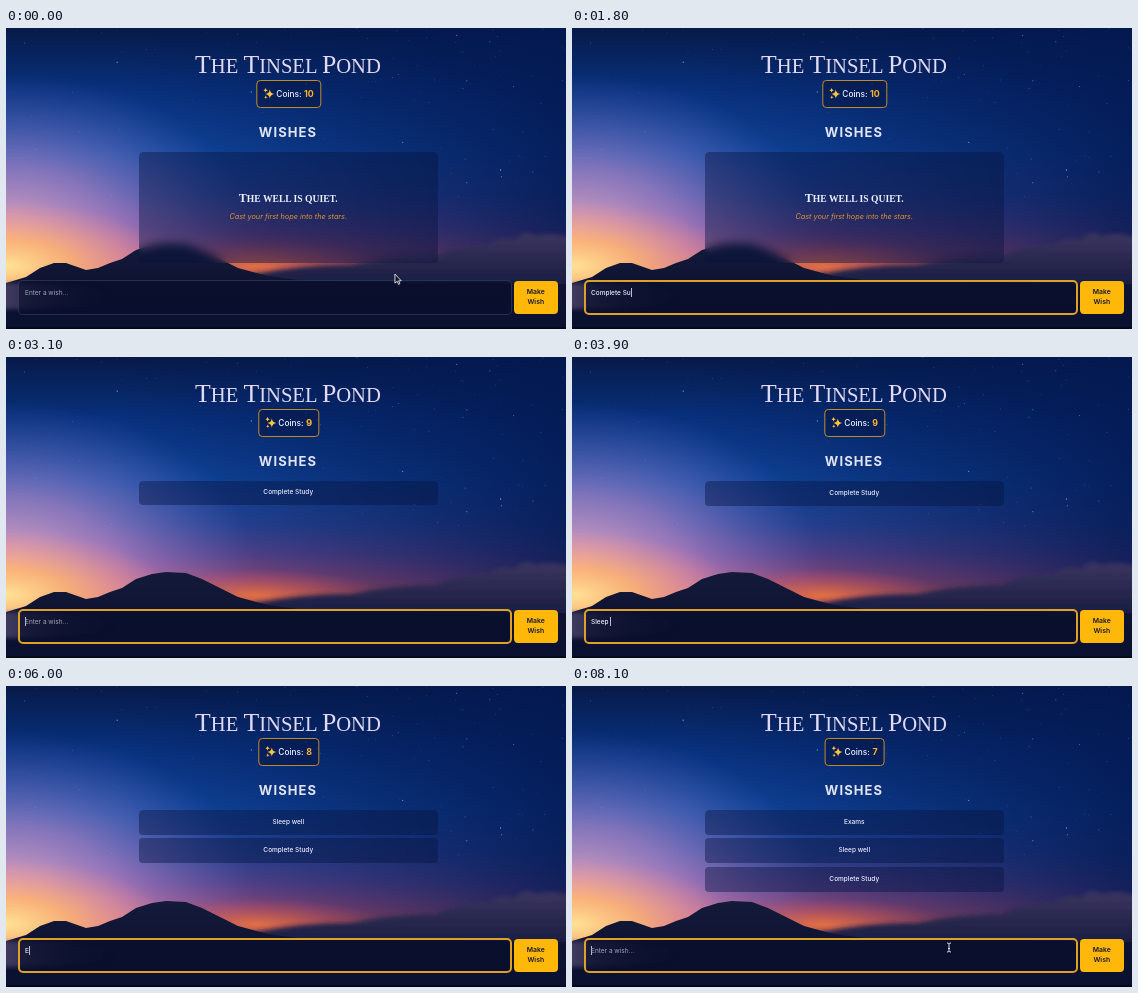
These frames come from a looping animation (560 by 301 pixels, 8.2 s). An HTML page:

```html
<!DOCTYPE html>
<html lang="en">
<head>
<meta charset="utf-8">
<title>Wishes</title>
<style>
  html, body { margin: 0; width: 100%; height: 100%; overflow: hidden; background: #050a20; }
  #stage { position: relative; width: 560px; height: 301px; overflow: hidden; font-family: Inter, sans-serif; color: #eef; }
  #stage > *, .panel { position: absolute; box-sizing: border-box; }
  .center { left: 0; width: 564px; text-align: center; white-space: nowrap; }
  .caps { font-family: "Liberation Serif", serif; text-transform: uppercase; }
  .caps b { font-size: 125%; font-weight: inherit; }
  #title { top: 22px; font-size: 20.6px; line-height: 30px; color: #e2daf2; }
  #coins { left: 282.5px; top: 51.5px; height: 28px; transform: translateX(-50%); display: flex; align-items: center;
    padding: 0 6.5px; border: 1px solid #c08a26; border-radius: 4px; background: rgba(5, 16, 55, .4);
    font-size: 8.3px; font-weight: 500; white-space: nowrap; }
  #coins svg { margin-right: 2px; }
  #count { display: inline-block; margin-left: 2.5px; font-size: 8.8px; font-weight: 700; color: #ffb52a; }
  #heading { top: 96px; font-size: 13px; line-height: 17px; font-weight: 700; letter-spacing: 1.1px; color: #e2e4f4; }
  .panel { left: 0; width: 299.5px; border-radius: 4px; background: rgba(9, 20, 62, .42); backdrop-filter: blur(5px); text-align: center; }
  #list { left: 132.5px; top: 123.5px; width: 299.5px; height: 120px; overflow: hidden; border-radius: 4px; }
  #empty { height: 111.5px; }
  #empty .caps { margin-top: 39px; font-size: 9.6px; line-height: 15px; font-weight: 700; }
  #empty i { display: block; margin-top: 4px; font-size: 7.3px; line-height: 13px; color: #d9942f; }
  .wish { height: 25px; font-size: 6.5px; font-weight: 500; line-height: 25px; }
  #field { left: 12px; top: 252px; width: 493.5px; height: 35px; border-radius: 5px; background: rgba(8, 14, 42, .6);
    border: 1px solid rgba(170, 170, 210, .2); }
  #field.focus { border: 2px solid #dfa02a; }
  #entry { left: 19px; top: 260px; font-size: 6.5px; font-weight: 500; line-height: 9px; white-space: pre; }
  #caret { display: inline-block; width: 1px; height: 8.5px; margin-right: -1px; vertical-align: -1.5px; background: #b9bccb; }
  #hint { font-weight: 400; color: #a4a5b8; }
  #button { left: 507.5px; top: 252.5px; width: 44.5px; height: 33px; border-radius: 4px; background: #ffb70a; color: #15182c;
    font-size: 6.8px; font-weight: 600; line-height: 10.5px; text-align: center; padding-top: 6px; }
</style>
</head>
<body>
<div id="stage">
  <svg width="560" height="301" viewBox="0 0 560 301">
    <defs>
      <linearGradient id="sky" x2="0" y2="1">
        <stop stop-color="#071a48"/>
        <stop offset=".2" stop-color="#08307c"/>
        <stop offset=".42" stop-color="#1149a2"/>
        <stop offset=".56" stop-color="#304ca0"/>
        <stop offset=".66" stop-color="#6b4d98"/>
        <stop offset=".74" stop-color="#b2557f"/>
        <stop offset=".8" stop-color="#e06052"/>
      </linearGradient>
      <linearGradient id="night">
        <stop offset=".2" stop-color="#031850" stop-opacity="0"/>
        <stop offset=".55" stop-color="#031850" stop-opacity=".4"/>
        <stop offset="1" stop-color="#031850" stop-opacity=".85"/>
      </linearGradient>
      <radialGradient id="dusk">
        <stop stop-color="#f0b4c0" stop-opacity=".95"/>
        <stop offset=".45" stop-color="#c490cc" stop-opacity=".6"/>
        <stop offset="1" stop-color="#6a70c8" stop-opacity="0"/>
      </radialGradient>
      <radialGradient id="glow">
        <stop stop-color="#ffe394"/>
        <stop offset=".4" stop-color="#ffb46a" stop-opacity=".8"/>
        <stop offset="1" stop-color="#f08a8a" stop-opacity="0"/>
      </radialGradient>
      <radialGradient id="ember">
        <stop stop-color="#f07840" stop-opacity=".8"/>
        <stop offset="1" stop-color="#c04a68" stop-opacity="0"/>
      </radialGradient>
      <linearGradient id="cloud" x2="0" y2="1">
        <stop stop-color="#3b3560"/>
        <stop offset=".4" stop-color="#1d2045"/>
        <stop offset="1" stop-color="#0a1030"/>
      </linearGradient>
      <linearGradient id="land" x2="0" y2="1">
        <stop stop-color="#141a3a"/>
        <stop offset=".5" stop-color="#0d1330"/>
        <stop offset="1" stop-color="#0a1030"/>
      </linearGradient>
      <linearGradient id="fog">
        <stop offset=".5" stop-color="#6a5c85"/>
        <stop offset="1" stop-color="#1b1c3b" stop-opacity="0"/>
      </linearGradient>
      <filter id="soft" x="-20%" y="-50%" width="140%" height="200%"><feGaussianBlur stdDeviation="2"/></filter>
    </defs>
    <rect width="560" height="301" fill="url(#sky)"/>
    <rect width="560" height="301" fill="url(#night)"/>
    <ellipse cx="0" cy="215" rx="250" ry="170" fill="url(#dusk)"/>
    <ellipse cx="0" cy="238" rx="165" ry="65" fill="url(#glow)"/>
    <ellipse cx="250" cy="238" rx="130" ry="26" fill="url(#ember)"/>
    <g id="stars" fill="#cfe0ff"></g>
    <path d="M225 251Q290 236 345 237Q385 228 430 228Q450 217 482 217Q495 207 508 212Q518 201 530 208Q546 203 565 210V320H225Z" fill="url(#cloud)" filter="url(#soft)"/>
    <path d="M-10 258L20 249 34 240 48 235 60 235 80 242 92 240 104 235 116 231 130 222 146 217 160 215 180 216 196 222 210 229 232 240 262 248 300 253 570 256V301H-10Z" fill="url(#land)"/>
    <ellipse cx="0" cy="268" rx="110" ry="13" fill="url(#fog)" opacity=".55" filter="url(#soft)"/>
    <path d="M0 299.5H560V301H0Z" fill="#03050f"/>
  </svg>

  <div id="title" class="center caps"><b>T</b>he <b>T</b>insel <b>P</b>ond</div>
  <div id="coins">
    <svg width="11" height="11" viewBox="0 0 11 11" fill="#ffc63d">
      <path d="M6.5 1.5Q7 5.5 11 6 7 6.5 6.5 10.5 6 6.5 2 6 6 5.5 6.5 1.5ZM2.3 0Q2.5 2 4.5 2.3 2.5 2.5 2.3 4.5 2 2.5 0 2.3 2 2 2.3 0ZM2.5 7.5Q2.7 9 4.2 9.2 2.7 9.4 2.5 11 2.3 9.4 .8 9.2 2.3 9 2.5 7.5Z"/>
    </svg>Coins:<span id="count">10</span>
  </div>
  <div id="heading" class="center">WISHES</div>
  <div id="list">
    <div id="empty" class="panel">
      <div class="caps"><b>T</b>he well is quiet.</div>
      <i>Cast your first hope into the stars.</i>
    </div>
  </div>
  <div id="field"></div>
  <div id="entry"><span id="typed"></span><span id="caret"></span><span id="hint">Enter a wish...</span></div>
  <div id="button">Make<br>Wish</div>
  <svg id="mouse" width="12" height="14" viewBox="0 0 12 14" style="left:0;top:0;overflow:visible">
    <path id="arrow" d="M0 0V9L2.2 7.2 3.6 10.2 5 9.6 3.6 6.7H6.3Z" fill="#16182a" stroke="#fff" stroke-width=".8"/>
    <path id="beam" d="M-2-4.5Q0-4.5 0-3.5Q0-4.5 2-4.5M0-3.5V3.5M-2 4.5Q0 4.5 0 3.5Q0 4.5 2 4.5M-1 1H1" fill="none" stroke="#d9d9e4"/>
  </svg>
</div>
<script>
const LOOP = 8200, FOCUS = 550, MOUSE_HIDES = 850, MOUSE_RETURNS = 7750, ROW_PITCH = 28.5;
const $ = id => document.getElementById(id);
const clamp = x => Math.min(1, Math.max(0, x));
const easeOut = x => 1 - (1 - clamp(x)) ** 3;

const wishes = [
  { at: 2880, text: 'Complete Study' },
  { at: 4510, text: 'Sleep well' },
  { at: 7050, text: 'Exams' }
];
// Each run of typing begins with `shown` characters and adds one per step.
const typing = [
  { at: 850, step: 85, shown: 1, text: 'Complete Su' },
  { at: 1950, step: 130, shown: 10, text: 'Complete Study' },
  { at: 3400, step: 95, shown: 1, text: 'Sleep well' },
  { at: 5940, step: 90, shown: 1, text: 'Exams' },
  ...[FOCUS, ...wishes.map(w => w.at)].map(at => ({ at, step: 1, shown: 0, text: '' }))
].sort((a, b) => a.at - b.at);

for (const wish of wishes) {
  wish.row = document.createElement('div');
  wish.row.className = 'panel wish';
  wish.row.textContent = wish.text;
  $('list').append(wish.row);
}

let seed = 7;
const random = () => (seed = seed * 16807 % 2147483647) / 2147483647;
for (let i = 0; i < 120; i++) {
  const star = document.createElementNS('http://www.w3.org/2000/svg', 'circle');
  const values = { cx: random() * 560, cy: 175 * random() ** 1.4, r: .3 + .35 * random() ** 3, opacity: .15 + .5 * random() };
  for (const key in values) star.setAttribute(key, values[key]);
  $('stars').append(star);
}

// A new wish slides in from above the list, pushing older ones down.
function drawWishes(t) {
  const cast = wishes.filter(w => t >= w.at);
  let top = 0;
  for (const wish of [...wishes].reverse()) {
    const p = easeOut((t - wish.at) / 250);
    wish.row.style.display = t < wish.at ? 'none' : '';
    wish.row.style.color = `rgba(238, 238, 255, ${p * p})`;
    wish.row.style.top = `${top - 13 * (1 - p)}px`;
    top += ROW_PITCH * p;
  }
  $('empty').style.display = cast.length ? 'none' : '';
  $('count').textContent = 10 - cast.length;
  const pop = cast.length ? 1 - clamp((t - cast.at(-1).at) / 300) : 0;
  $('count').style.transform = `scale(${1 + .35 * pop})`;
}

function drawEntry(t) {
  const run = typing.filter(r => t >= r.at).at(-1);
  const keys = run ? Math.min(run.text.length - run.shown, Math.floor((t - run.at) / run.step)) : 0;
  const text = run ? run.text.slice(0, run.shown + keys) : '';
  const blinkOn = run && (t - run.at - keys * run.step) % 1000 < 500;
  $('typed').textContent = text;
  $('caret').style.visibility = blinkOn ? 'visible' : 'hidden';
  $('hint').style.display = text ? 'none' : '';
  $('field').className = run ? 'focus' : '';
}

function drawMouse(t) {
  const p = easeOut(t / 450), back = t >= MOUSE_RETURNS;
  const x = back ? 377 : 389 - 8 * p, y = back ? 261.5 : 246 + 16 * p;
  const inField = y > 253;
  $('mouse').style.display = t < MOUSE_HIDES || back ? '' : 'none';
  $('mouse').style.transform = `translate(${x}px, ${y}px)`;
  $('arrow').style.display = inField ? 'none' : '';
  $('beam').style.display = inField ? '' : 'none';
}

function frame() {
  const t = performance.now() % LOOP;
  drawWishes(t);
  drawEntry(t);
  drawMouse(t);
  requestAnimationFrame(frame);
}
frame();
</script>
</body>
</html>
```
